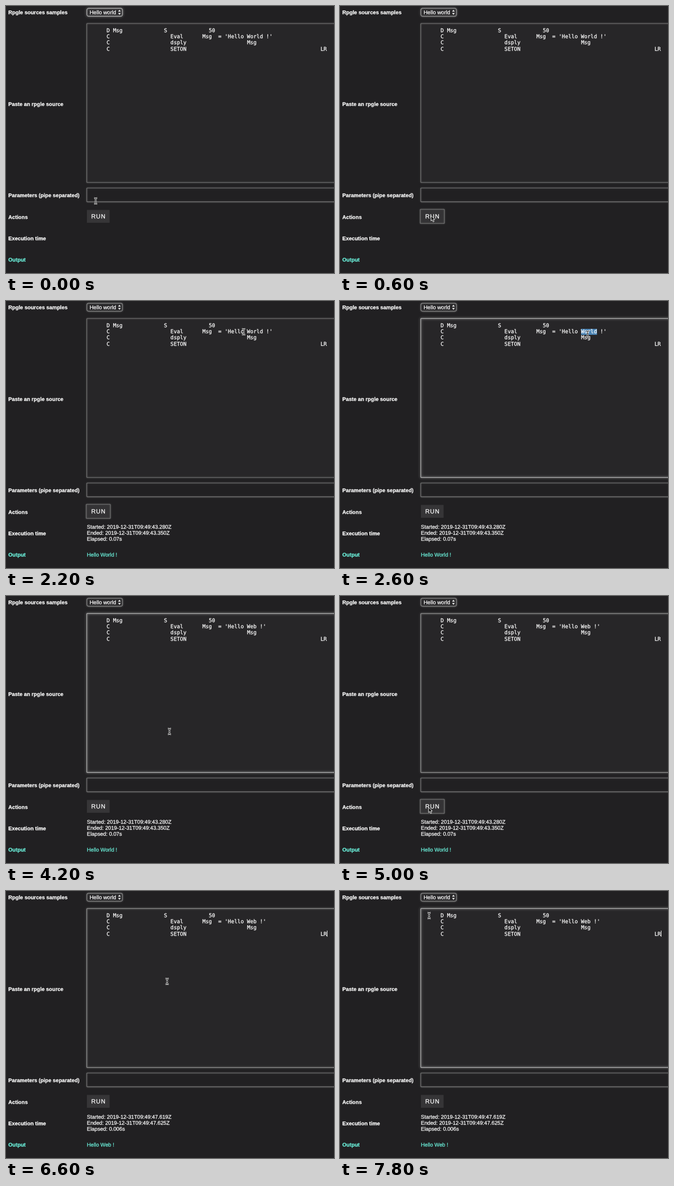
Write an HTML page with a canvas that moves like this. It is 600 px wide and 489 px high and loops after 8 s.

```html
<!DOCTYPE html>
<html lang="en">
<head>
<meta charset="utf-8">
<title>Rpgle runner</title>
<style>
  html, body { margin: 0; width: 100%; height: 100%; overflow: hidden; background: #212022; }
  canvas { display: block; }
</style>
</head>
<body>
<canvas id="stage" width="600" height="489"></canvas>
<script>
const ctx = document.getElementById('stage').getContext('2d');
const LOOP = 8000, STEP = 200;
const SANS = '"Liberation Sans", Arial, sans-serif';
const MONO = '9.7px "DejaVu Sans Mono", monospace';
const COL = 5.84, CODE_X = 184, CODE_Y = 48, LINE = 11.2;
const PAGE = '#212022', FIELD = '#272628', WHITE = '#fff', TEAL = '#6cf3dd';

const RUN_1 = 600, EDIT = 2400, SELECT = 2600, TYPE = 3000, RUN_2 = 5000, BLUR = 5800, EDIT_2 = 6600;

// Pointer keys: time, x, y, kind (i: text beam, a: arrow, empty: hidden)
const path = [
  [0, 164, 357, 'i'], [200, 164, 377, 'a'], [400, 166, 385, 'a'], [800, 167, 383, 'a'],
  [1000, 230, 250, 'i'], [1200, 344, 64, 'i'], [1400, 361, 43.5, 'i'],
  [1800, 398, 49, 'i'], [2400, 453, 60, 'i'], [TYPE, 453, 60, ''],
  [3600, 440, 82, 'i'], [3800, 366, 176, 'i'], [4000, 302, 245, 'i'], [4200, 299, 248, 'i'],
  [4400, 216, 330, 'i'], [4600, 162, 387, 'a'], [5200, 162, 387, 'a'],
  [5400, 170, 425, 'a'], [5600, 179, 459, 'a'], [5800, 181, 463, 'a'], [6000, 183, 457, 'a'],
  [6200, 222, 345, 'i'], [6400, 282, 196, 'i'], [6600, 294.7, 165.5, 'i'], [6800, 294.7, 165.5, 'i'],
  [7000, 252, 131, 'i'], [7200, 205, 97, 'i'], [7400, 176, 62, 'i'], [7600, 164, 46, 'i'], [7800, 163, 45, 'i']
];

const clamp = v => Math.max(0, Math.min(1, v));
const mix = (a, b, k) => a + (b - a) * k;
const fade = (t, start) => clamp((t - start + 150) / 300);
const between = (t, a, b) => t >= a && t < b;
const blink = (t, start) => (t - start) % 1100 < 550;
const gray = v => `rgb(${v},${v},${v})`;

// A hairline outline gives the text its slightly heavy weight
function text(s, x, y, font, color = WHITE) {
  ctx.font = font;
  ctx.fillStyle = ctx.strokeStyle = color;
  ctx.lineWidth = 0.25;
  ctx.fillText(s, x, y);
  ctx.strokeText(s, x, y);
}
const label = (s, y, color) => text(s, 4.3, y, 'bold 9.7px ' + SANS, color);
const plain = (s, x, y, color) => text(s, x, y, '9.7px ' + SANS, color);
const code = (s, col, row) => text(s, CODE_X + col * COL, CODE_Y + row * LINE, MONO);

function box(x, y, w, h, r, fill, focus) {
  ctx.save();
  ctx.beginPath();
  ctx.roundRect(x, y, w, h, r);
  ctx.fillStyle = fill;
  ctx.fill();
  ctx.strokeStyle = gray(Math.round(mix(118, 165, focus)));
  ctx.lineWidth = mix(1.1, 1.4, focus);
  ctx.shadowColor = gray(Math.round(mix(100, 160, focus)));
  ctx.shadowBlur = mix(3, 4, focus);
  ctx.stroke();
  ctx.restore();
}

function caret(col, row) {
  ctx.fillStyle = WHITE;
  ctx.fillRect(CODE_X + col * COL, CODE_Y + row * LINE - 9, 1, 11);
}

function drawSelect(focus) {
  box(147.8, 4.2, 65.4, 14.6, 3.5, FIELD, mix(0.3, 1, focus));
  text('Hello world', 153, 14.7, '9.8px ' + SANS);
  ctx.fillStyle = WHITE;
  for (const d of [-1, 1]) {
    ctx.beginPath();
    ctx.moveTo(205, 11.5 + d * 1.3);
    ctx.lineTo(210, 11.5 + d * 1.3);
    ctx.lineTo(207.5, 11.5 + d * 4.6);
    ctx.fill();
  }
}

function drawEditor(t) {
  const focus = t < EDIT_2 ? fade(t, EDIT) - fade(t, RUN_2) : fade(t, EDIT_2);
  box(147.7, 32, 480, 291.3, 1, FIELD, clamp(focus));
  const typed = t < TYPE ? 'World' : 'Web'.slice(0, 1 + (t - TYPE) / 200);
  if (between(t, SELECT, TYPE)) {
    ctx.fillStyle = '#4c85b5';
    ctx.fillRect(CODE_X + 44 * COL, 51, 5 * COL, 11);
  }
  code('D Msg', 0, 0);
  code('S', 18, 0);
  code('50', 32, 0);
  for (let row = 1; row < 4; row++) code('C', 0, row);
  code('Eval', 20, 1);
  code(`Msg  = 'Hello ${typed} !'`, 30, 1);
  code('dsply', 20, 2);
  code('Msg', 44, 2);
  code('SETON', 20, 3);
  code('LR', 67, 3);
  if (between(t, TYPE, 3500) || (between(t, 3500, RUN_2) && blink(t, 3500))) caret(44 + typed.length, 1);
  if (t >= EDIT_2 && blink(t, EDIT_2)) caret(69, 3);
}

function drawButton(t) {
  ctx.fillStyle = '#363537';
  ctx.fillRect(148, 373.5, 41.5, 23.5);
  if (between(t, RUN_1, EDIT) || between(t, RUN_2, BLUR)) {
    box(146.7, 372.3, 44.3, 25.9, 1, '#343335', 0);
  }
  ctx.letterSpacing = '0.9px';
  text('RUN', 156, 388.8, '11px ' + SANS);
  ctx.letterSpacing = '0px';
}

function drawResult(t) {
  if (t < RUN_1 + 200) return;
  const [from, to, spent, word] = t < RUN_2 + 200
    ? ['43.280', '43.350', '0.07', 'World']
    : ['47.619', '47.625', '0.006', 'Web'];
  const day = '2019-12-31T09:49:';
  plain(`Started: ${day}${from}Z`, 148, 417.2);
  plain(`Ended: ${day}${to}Z`, 148, 428.2);
  plain(`Elapsed: ${spent}s`, 148, 439.4);
  plain(`Hello ${word} !`, 148, 467.6, TEAL);
}

function drawBeam(x, y) {
  ctx.beginPath();
  for (const d of [-1, 1]) {
    ctx.moveTo(x - 3, y + d * 5.3);
    ctx.quadraticCurveTo(x, y + d * 5.3, x, y + d * 3);
    ctx.quadraticCurveTo(x, y + d * 5.3, x + 3, y + d * 5.3);
  }
  ctx.moveTo(x, y - 3.5);
  ctx.lineTo(x, y + 3.5);
  ctx.moveTo(x - 1.6, y);
  ctx.lineTo(x + 1.6, y);
  ctx.lineWidth = 2.6;
  ctx.strokeStyle = '#f4f4f4';
  ctx.stroke();
  ctx.lineWidth = 0.9;
  ctx.strokeStyle = '#111';
  ctx.stroke();
}

function drawArrow(x, y) {
  ctx.beginPath();
  ctx.moveTo(x, y);
  [[0, 9.6], [2.2, 7.6], [3.8, 11.4], [5.6, 10.6], [4, 6.9], [7, 6.9]]
    .forEach(([dx, dy]) => ctx.lineTo(x + dx, y + dy));
  ctx.closePath();
  ctx.fillStyle = '#111';
  ctx.fill();
  ctx.lineWidth = 1;
  ctx.strokeStyle = '#eee';
  ctx.stroke();
}

function drawPointer(t) {
  let i = path.length - 1;
  while (path[i][0] > t) i--;
  const a = path[i], b = path[i + 1] || a;
  if (!a[3]) return;
  const k = b === a ? 0 : (t - a[0]) / (b[0] - a[0]);
  const draw = a[3] === 'i' ? drawBeam : drawArrow;
  draw(mix(a[1], b[1], k), mix(a[2], b[2], k));
}

function draw(t) {
  ctx.fillStyle = PAGE;
  ctx.fillRect(0, 0, 600, 489);
  label('Rpgle sources samples', 15.3);
  label('Paste an rpgle source', 182.8);
  label('Parameters (pipe separated)', 350);
  label('Actions', 389.5);
  label('Execution time', 428.8);
  label('Output', 468, TEAL);
  drawSelect(1 - fade(t, RUN_1));
  drawEditor(t);
  box(147.7, 333.2, 480, 25.4, 1, PAGE, 0);
  drawButton(t);
  drawResult(t);
  drawPointer(t);
}

ctx.textRendering = 'geometricPrecision';
const begin = performance.now();
function tick(now) {
  const t = Math.max(0, now - begin) % LOOP;
  draw(Math.floor(t / STEP) * STEP);
  requestAnimationFrame(tick);
}
draw(0);
requestAnimationFrame(tick);
</script>
</body>
</html>
```
